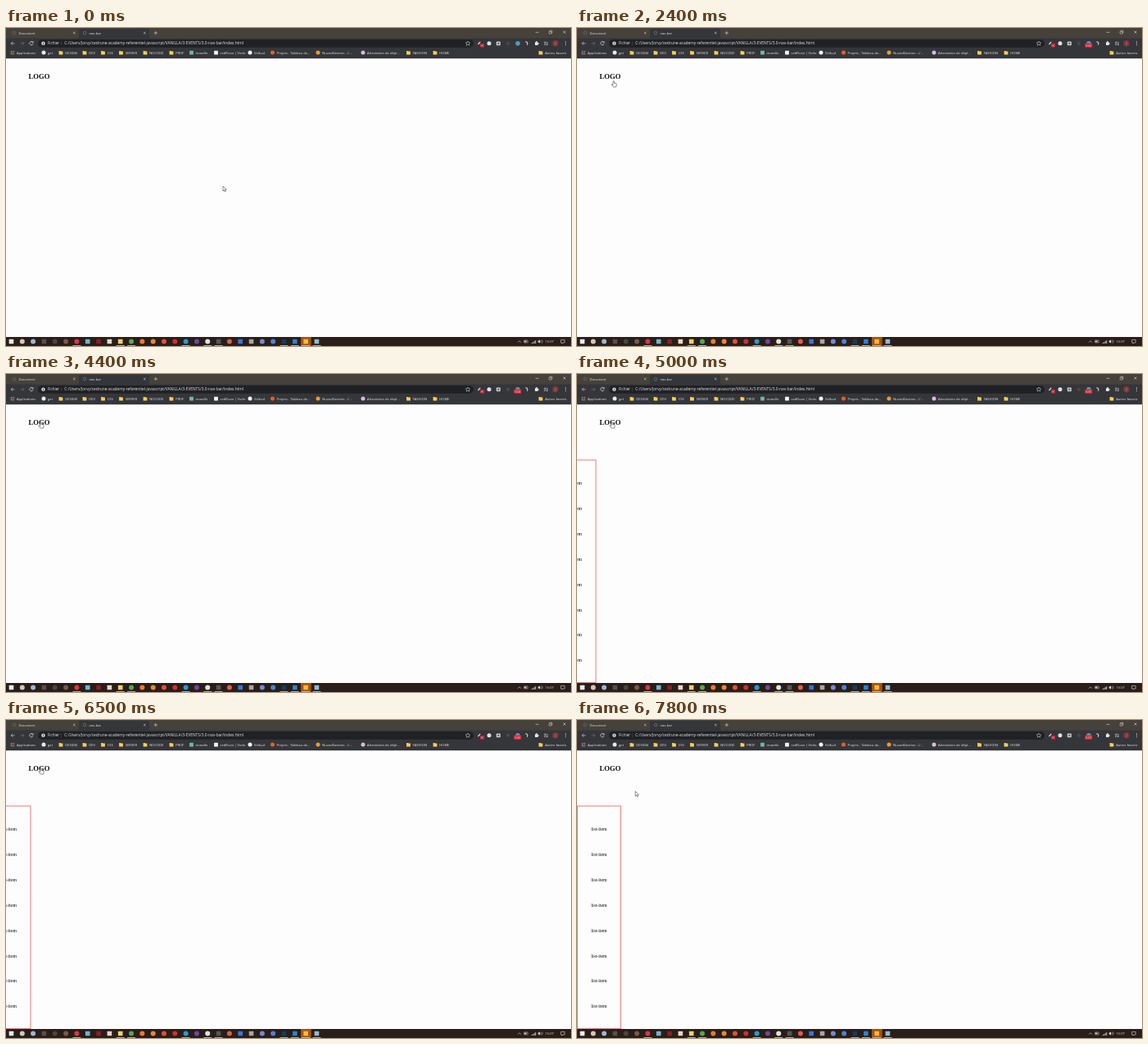
These frames come from a looping animation (690x388 px, 8 s). An HTML page:

```html
<!DOCTYPE html>
<html lang="fr">
<head>
<meta charset="utf-8">
<title>nav-bar</title>
<style>
html, body { margin: 0; height: 100%; overflow: hidden; background: #fdfdfd; }
svg { display: block; width: 100%; height: 100%; }
text { font: 4.1px "Open Sans", "Noto Sans", sans-serif; fill: #e4e6e8; white-space: pre; }
.page { font-family: "Liberation Serif", serif; fill: #0a0a0a; }
.bold { font-weight: bold; }
</style>
</head>
<body>
<svg id="stage" viewBox="0 0 690 388"></svg>
<script>
const rect = (x, y, w, h, fill, r = 0, more = '') =>
  `<rect x="${x}" y="${y}" width="${w}" height="${h}" rx="${r}" fill="${fill}" ${more}/>`;
const dot = (x, y, r, fill, more = '') => `<circle cx="${x}" cy="${y}" r="${r}" fill="${fill}" ${more}/>`;
const line = (d, color = '#dcdee0', w = .6) => `<path d="${d}" fill="none" stroke="${color}" stroke-width="${w}"/>`;
const text = (x, y, s, size = 4.1, more = '') => `<text x="${x}" y="${y}" style="font-size:${size}px" ${more}>${s}</text>`;
const cross = (x, y, r = 1.2) => line(`M${x - r} ${y - r}l${2 * r} ${2 * r}m0 ${-2 * r}l${-2 * r} ${2 * r}`);
const folder = x => `<path d="M${x - 2.4} 27.9h2l.6.7h2.2v4h-4.8z" fill="#f5cf58"/>`;

function tabs() {
  return rect(0, 0, 690, 13, '#46423b') +
    `<path d="M87 13q2 0 2-2V3q0-2 2-2h82q2 0 2 2v8q0 2 2 2z" fill="#35363a"/>` +
    dot(10, 6, 1.8, 'none', 'stroke="#6d6e70" stroke-width=".7"') +
    dot(96, 6, 1.8, 'none', 'stroke="#77787b" stroke-width=".7"') +
    text(15.5, 7.6, 'Document') + text(101.5, 7.6, 'nav-bar') +
    cross(83.3, 6) + cross(169.3, 6) +
    line('M180.6 6h4.4m-2.2-2.2v4.4') +
    line('M646.6 5.3h4') + line('M663.2 4.2h2.8v2.8h-2.8zM664.1 4.2v-1h2.8v2.8h-.9', '#dcdee0', .5) +
    cross(682, 5, 1.5);
}

function toolbar() {
  return rect(0, 12.5, 690, 24.7, '#35363a') +
    line('M10.6 18.8h-4.4m2-2l-2 2l2 2') +
    line('M17.6 18.8h4.4m-2-2l2 2l-2 2', '#77797c') +
    line('M32.7 17.2a2.2 2.2 0 1 0 .4 2.2M33.1 16.2v1.8h-1.8', '#dcdee0', .7) +
    rect(39, 14, 532, 9.8, '#202124', 4.9) +
    dot(45.5, 18.8, 2.2, '#dcdee0') + rect(45.1, 18.3, .8, 1.8, '#202124') + rect(45.1, 17.3, .8, .6, '#202124') +
    text(51, 20.4, 'Fichier', 4.6) + rect(67.3, 16.6, .4, 4.5, '#6c6e71') +
    text(71.3, 20.4, 'C:/Users/Jorvy/cedrune-academy-referentiel-javascript/VANILLA/3-EVENTS/3.0-nav-bar/index.html', 4.83) +
    `<path d="M564 16l.8 1.8 2 .2-1.5 1.3.5 2-1.8-1.1-1.8 1.1.5-2-1.5-1.3 2-.2z" fill="none" stroke="#dcdee0" stroke-width=".5"/>` +
    line('M576.4 20l2.8-3', '#dcdee0', 1.2) + rect(579, 19.2, 5, 4.4, '#e0243c', .8) + cross(581.5, 21.4, .8) +
    dot(590, 18.8, 2.5, '#dfe3e6') + rect(598.8, 16.6, 5, 4.6, '#c8cacc', .7) + dot(601.3, 18.9, 1.1, '#55585b') +
    dot(613, 18.8, 2.2, '#45494d') + dot(625, 18.8, 2.8, '#4d9cc0') +
    line('M634 17h2.5v4M635.4 17l2.4 2.2', '#d7d9db', .8) +
    rect(646, 17.2, 3.7, 3.7, '#e2e4e6', .4) + dot(648, 17, .9, '#e2e4e6') + dot(649.8, 19, .9, '#e2e4e6') +
    line('M657 17.2h3m-3 1.6h3m-3 1.6h2M661.2 17v3.2') + dot(660.7, 20.4, .7, '#e2e4e6') +
    dot(671, 18.8, 3.7, '#80383a') + text(671, 20.3, 'J', 4.1, 'text-anchor="middle"') +
    [16.9, 18.8, 20.7].map(y => dot(683.4, y, .55, '#e2e4e6')).join('');
}

function bookmarks() {
  const folders = [[67, 'DESIGN'], [96, 'DEV'], [118.5, 'CSS'], [140.5, 'SERVER'], [170, 'NOCODE'],
    [202, 'PROF'], [491.5, 'FASHION'], [524, 'HOME'], [653, 'Autres favoris']];
  const sites = [[46, '#e6e8e9', 'get'], [226.5, '#75b5a6', 'moodle', true], [256.5, '#f1f3f4', 'cedRune | Vorlo', true],
    [298, '#f4f4f4', 'Velkud'], [325.5, '#e0602f', 'Projets - Tableau de...'],
    [381, '#ee9a32', "NuvodGestion - L'..."], [436, '#d7bdd9', 'Attestation de dépl...']];
  let out = text(13, 31.7, 'Applications');
  const hues = ['#e86555', '#e7b84b', '#6caf70', '#6099e8'];
  for (let i = 0; i < 9; i++) out += rect(5.7 + i % 3 * 1.7, 27.9 + (i / 3 | 0) * 1.7, 1.1, 1.1, hues[i * 3 % 4]);
  for (const [x, name] of folders) out += folder(x) + text(x + 5.2, 31.7, name);
  for (const [x, color, name, square] of sites) {
    out += (square ? rect(x - 2.4, 27.7, 4.8, 4.8, color, .4) : dot(x, 30.1, 2.5, color)) +
      text(x + 5.1, 31.7, name);
  }
  return out;
}

function taskbar() {
  // one mark per slot, evenly spaced; "*" means the app is open
  const apps = `#f0f0f0 #d5c7b8 #9db8cc #55504d #4a4542 #7a5a46 #dc3545* #73b3d2 #8b2028 #e7d9cb
    #f0cf70* #58a55a* #ed7a32 #e88932 #e84e32 #d52b35 #249bd8* #75459c #dce5df* #56585a*
    #e45a4f #3974dc #a9a5a3 #748bd3 #4b83db #123c60* #2686d3* #f6bd38* #8dbdd1*`.split(/\s+/);
  const squares = [0, 3, 7, 8, 9, 10, 19, 21, 22, 25, 26, 27, 28];
  let out = rect(0, 377, 690, 11, '#291e19') + rect(360, 377, 12.7, 11, '#a65316');
  for (const [i, app] of apps.entries()) {
    const x = 6.5 + i * 13.32, color = app.slice(0, 7);
    out += squares.includes(i) ? rect(x - 2.8, 379.7, 5.6, 5.6, color, .5) : dot(x, 382.5, 3, color);
    if (app.endsWith('*')) out += rect(x - 5, 387.1, 10, .9, '#c6b9aa');
  }
  return out +
    line('M625 383.7l2-2l2 2') +
    rect(632.6, 381, 4.6, 2.9, 'none', .2, 'stroke="#ddd" stroke-width=".5"') + rect(633.2, 381.6, 2.3, 1.7, '#ddd') +
    line('M642.2 385v-1m1.5 1v-2m1.5 2v-3m1.5 3v-4', '#ddd', .8) +
    `<path d="M649.7 381.5h1l1.4-1.2v4.5l-1.4-1.2h-1z" fill="#ddd"/>` +
    line('M653 381.3q1 1.2 0 2.5M654.4 380.4q1.8 2.1 0 4.2', '#ddd', .5) +
    text(658.6, 384.2, '16:07', 4) +
    line('M677.7 380.4h4.5v3.6h-2.2l-1 1v-1h-1.3z', '#ddd', .6);
}

const items = Array.from({ length: 8 }, (_, i) =>
  text(17.2, 134.9 + i * 30.93, 'list-item', 5.8, 'class="page"')).join('');

document.getElementById('stage').innerHTML =
  rect(0, 0, 690, 388, '#fdfdfd') +
  text(27.6, 61.5, 'LOGO', 8.6, 'class="page bold"') +
  `<g id="menu">${rect(.5, 105, 53, 271.6, '#fdfdfd', 0, 'stroke="#f0555a" stroke-width=".8"')}${items}</g>` +
  tabs() + toolbar() + bookmarks() + taskbar() +
  `<g id="badge">${rect(620.3, 18.8, 9, 5, '#e3202f', .8)}${text(624.8, 22.8, '', 3.7, 'text-anchor="middle" id="clock"')}</g>
  <circle id="ring" fill="none" stroke="#333" stroke-width=".9"/>
  <g id="arrow"><path d="M0 0v6l1.4-1.3.9 2.1 1-.5-.9-2h1.9z" fill="#fff" stroke="#333" stroke-width=".55"/></g>
  <g id="hand"><path d="M-.7.5q.7-1 1.4 0v2.2l2.3.6q.8.3.6 1.3l-.6 2.9h-3.5l-2-2.8q-.1-1 .8-.6l1 .8z"
    fill="#fff" stroke="#333" stroke-width=".55"/></g>`;

const el = id => document.getElementById(id);
const [menu, badge, clock, ring, arrow, hand] = ['menu', 'badge', 'clock', 'ring', 'arrow', 'hand'].map(el);
const clamp = v => Math.min(1, Math.max(0, v));
const ease = v => (v = clamp(v), v * v * (3 - 2 * v));

// pointer stops: time, x, y
const path = [[0, 265, 193], [100, 265, 193], [600, 284, 171], [800, 284, 171], [1500, 52.3, 71], [1650, 52.3, 71],
  [1800, 48, 69], [2000, 48, 69], [2500, 44.4, 64], [3100, 44.4, 64], [3500, 42.6, 58.6],
  [7420, 42.6, 58.6], [7780, 71.2, 87], [8000, 71.2, 87]];

function pointer(t) {
  const i = path.findIndex(p => p[0] > t), [t0, x0, y0] = path[i - 1], [t1, x1, y1] = path[i];
  const k = ease((t - t0) / (t1 - t0));
  return [x0 + (x1 - x0) * k, y0 + (y1 - y0) * k];
}

function draw(now) {
  const t = now % 8000, [x, y] = pointer(t);
  const slide = start => ease((t - start) / 300);
  const open = slide(4864) - slide(6364) + slide(7364);
  menu.setAttribute('transform', `translate(${-54 * (1 - open)})`);
  menu.style.display = open > 0 ? '' : 'none';

  badge.style.display = t < 100 ? 'none' : '';
  clock.textContent = '0:0' + Math.floor(t / 1000);

  const over = x < 54 && y < 66;
  arrow.style.display = over ? 'none' : '';
  hand.style.display = over ? '' : 'none';
  (over ? hand : arrow).setAttribute('transform', `translate(${x} ${y})`);

  // shrinking locator circle
  const r = 35 * (1 - (t - 2680) / 390);
  ring.style.display = t >= 2680 && r > 0 ? '' : 'none';
  ring.setAttribute('cx', x);
  ring.setAttribute('cy', y);
  ring.setAttribute('r', Math.max(0, r));
  requestAnimationFrame(() => draw(performance.now()));
}
draw(performance.now());
</script>
</body>
</html>
```
